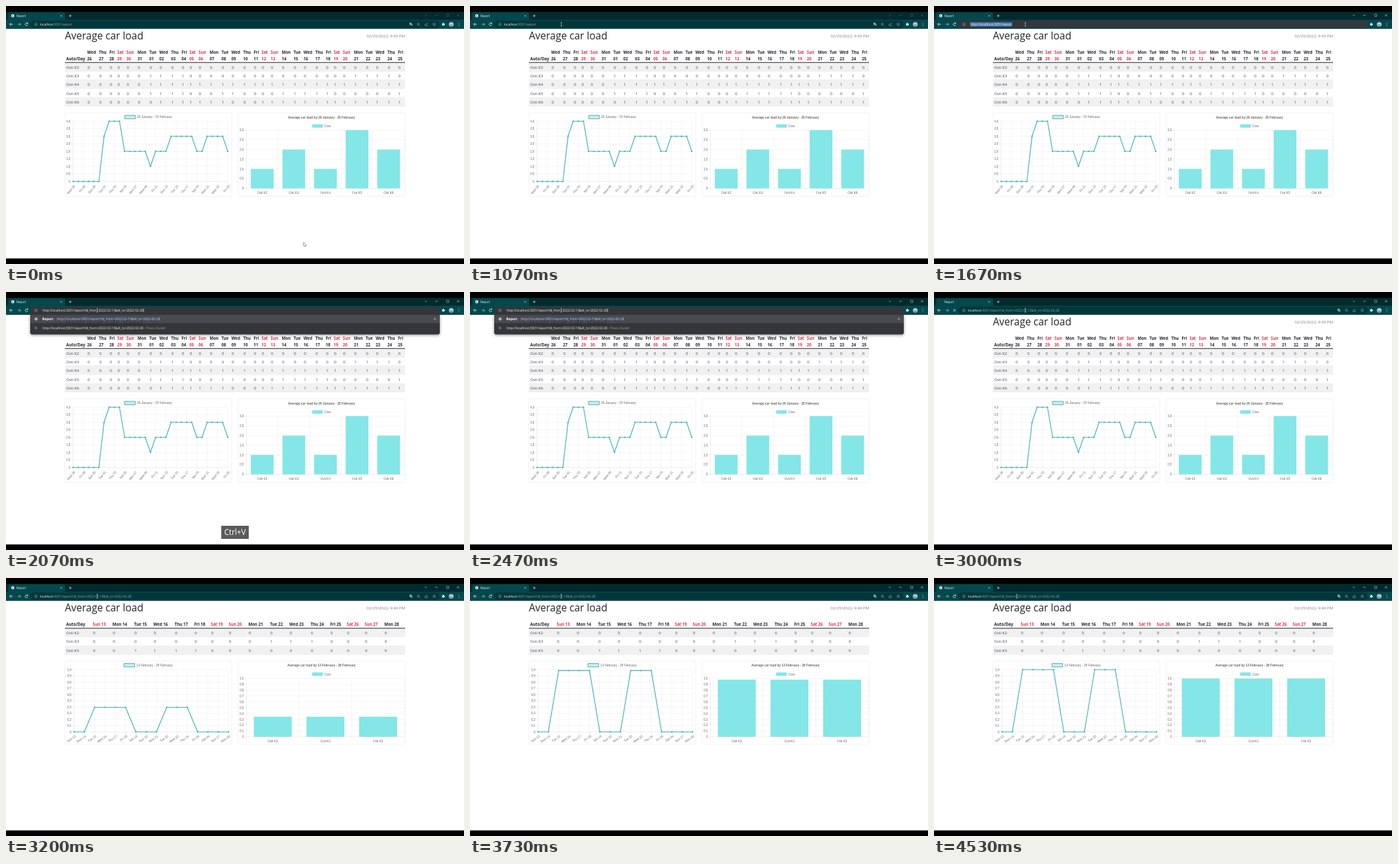
An HTML page with a canvas for the animation above (4.59 s loop, 700 by 394 pixels).

```html
<!DOCTYPE html>
<html lang="en">
<head>
<meta charset="utf-8">
<title>Report</title>
<style>
html, body { margin: 0; width: 100%; height: 100%; overflow: hidden; background: #000; }
canvas { display: block; width: 700px; height: 394px; }
</style>
</head>
<body>
<canvas id="stage"></canvas>
<script>
const LOOP = 4590;
const T = { moveStart: 120, moveEnd: 800, focus: 1400, paste: 1870, keyOff: 2420, enter: 2700,
            close: 2790, page: 3070, lineStart: 3083, barStart: 3100, nudge: 4390, nudgeEnd: 4520 };
const UI = '"Open Sans", "Noto Sans", sans-serif';
const CHART = '"Liberation Sans", Arial, sans-serif';
const TEAL = '#45b4ba', BAR = '#84e6e6', INK = '#212529', RED = '#dc3545', GREY = '#666';
const TOOLBAR = '#04484d', FRAME = '#022b2f', FIELD = '#03363a', PANEL = '#35363a';
const PATH = ':3001/report', QUERY = '?dt_from=2022-02-13&dt_to=2022-02-28';
const DAYS = ['Sun', 'Mon', 'Tue', 'Wed', 'Thu', 'Fri', 'Sat'];

const canvas = document.getElementById('stage');
const ctx = canvas.getContext('2d');
const dpr = window.devicePixelRatio || 1;
canvas.width = 700 * dpr;
canvas.height = 394 * dpr;

const clamp = v => Math.max(0, Math.min(1, v));
const progress = (t, a, b) => clamp((t - a) / (b - a));
const easeInOut = p => p * p * (3 - 2 * p);
const easeOutQuart = p => 1 - (1 - p) ** 4;
const two = n => String(n).padStart(2, '0');

function rect(x, y, w, h, color, r = 0) {
  ctx.fillStyle = color;
  ctx.beginPath();
  ctx.roundRect(x, y, w, h, r);
  ctx.fill();
}

function line(points, color, width = 0.6) {
  ctx.strokeStyle = color;
  ctx.lineWidth = width;
  ctx.lineJoin = 'round';
  ctx.beginPath();
  points.forEach(([x, y], i) => i ? ctx.lineTo(x, y) : ctx.moveTo(x, y));
  ctx.stroke();
}

function circle(x, y, r, color, width) {
  ctx.beginPath();
  ctx.arc(x, y, r, 0, Math.PI * 2);
  ctx.fillStyle = ctx.strokeStyle = color;
  ctx.lineWidth = width || 1;
  width ? ctx.stroke() : ctx.fill();
}

// y is the middle of the capitals; returns the x where the text ends
function text(s, x, y, size, color, { family = UI, weight = 400, align = 'left' } = {}) {
  ctx.font = `${weight} ${size}px ${family}`;
  ctx.textAlign = align;
  ctx.fillStyle = color;
  ctx.fillText(s, x, y + size * 0.36);
  return x + ctx.measureText(s).width;
}

const chartText = (s, x, y, align = 'left', weight = 400) =>
  text(s, x, y, 4.75, GREY, { family: CHART, align, weight });

// Days are column left edges: one width per weekday, Sunday first
function dayColumns(x, weekday, date, monthEnd, count, widths) {
  return Array.from({ length: count }, (_, i) => {
    const day = (weekday + i) % 7;
    const col = { x, name: DAYS[day], date: two((date + i - 1) % monthEnd + 1), weekend: day % 6 === 0 };
    x += widths[day];
    return col;
  });
}

const reports = {
  january: {
    range: '26 January - 25 February', clock: '02/25/2022, 9:45 PM',
    columns: dayColumns(124, 3, 26, 31, 31, [17, 18, 15.25, 18, 16, 12, 14]),
    stacked: true, ruleY: 86.3,
    rows: [
      ['Ovli K2', '0'.repeat(31)],
      ['Ovli K3', '0000001111' + '0'.repeat(16) + '11110'],
      ['Ovli K4', '000000' + '1'.repeat(25)],
      ['Ovli K5', '0000001111000110000111110000001'],
      ['Ovli K6', '00000001111111000' + '1'.repeat(14)]
    ],
    chartTop: 163,
    line: { x: 102.5, end: 339, top: 176, base: 268, max: 4, step: 0.5, every: 2, tilt: 50,
            values: [...'0000003444222221222333332233332'].map(Number) },
    bar: { top: 189.5, base: 278.5, max: 3, step: 0.5,
           names: [2, 3, 4, 5, 6], values: [1, 2, 1, 3, 2] }
  },
  february: {
    range: '13 February - 28 February', clock: '02/25/2022, 9:46 PM',
    columns: dayColumns(132.5, 0, 13, 31, 16, [30.25, 33, 29.5, 32.5, 30, 25.25, 27.25]),
    stacked: false, ruleY: 76.7,
    rows: [
      ['Ovli K2', '0'.repeat(16)],
      ['Ovli K3', '0000000001110000'],
      ['Ovli K5', '0011110000000000']
    ],
    chartTop: 126.6,
    line: { x: 104, end: 340, top: 140, base: 235, max: 1, step: 0.1, every: 1, tilt: 34,
            values: [...'0011110001110000'].map(Number) },
    bar: { top: 153.5, base: 242.5, max: 1, step: 0.1, names: [2, 3, 5], values: [1, 1, 1] }
  }
};

function table({ columns, rows, stacked, ruleY }) {
  const bold = { weight: 700 };
  const headY = ruleY - 6;
  text('Auto/Day', 92, headY, 6.15, INK, bold);
  for (const { x, name, date, weekend } of columns) {
    const color = weekend ? RED : INK;
    if (stacked) {
      text(name, x, headY - 9.3, 6.15, color, bold);
      text(date, x, headY, 6.15, color, bold);
    } else text(`${name} ${date}`, x, headY, 6.15, color, bold);
  }
  rows.forEach(([name, cells], r) => {
    const top = ruleY + r * 13.3;
    if (r % 2 === 0) rect(90, top, 520, 13.3, '#f1f1f2');
    rect(90, top + 13, 520, 0.4, '#dee2e6');
    text(name, 92, top + 7.1, 6.15, '#40454a');
    columns.forEach((c, i) => text(cells[i], c.x + 0.5, top + 7.1, 6.15, '#40454a'));
  });
  rect(90, ruleY - 0.5, 520, 1, INK);
}

function card(x, y) {
  ctx.strokeStyle = '#e6e7e8';
  ctx.lineWidth = 0.6;
  ctx.beginPath();
  ctx.roundRect(x, y, 255, 127.5, 2);
  ctx.stroke();
}

function valueAxis({ top, base, max, step }, x0, x1) {
  const n = Math.round(max / step);
  for (let i = 0; i <= n; i++) {
    const y = base - (base - top) * i / n;
    line([[x0 - 3, y], [x1, y]], i ? '#e8e8e8' : '#d8d8d8', 0.45);
    chartText(i ? (i * step).toFixed(1).replace('.', ',') : '0', x0 - 4, y, 'right');
  }
}

function lineChart({ range, columns, chartTop, line: c }, grow) {
  card(90, chartTop);
  const step = (c.end - c.x) / (c.values.length - 1);
  ctx.font = `4.75px ${CHART}`;
  const left = 217.5 - (19 + ctx.measureText(range).width) / 2;
  rect(left, chartTop + 4, 16.4, 5.2, '#d2ebec');
  ctx.strokeStyle = TEAL;
  ctx.lineWidth = 1;
  ctx.strokeRect(left, chartTop + 4, 16.4, 5.2);
  chartText(range, left + 19, chartTop + 6.5);

  valueAxis(c, c.x, c.end);
  columns.forEach((col, i) => {
    if (i % c.every) return;
    const x = c.x + i * step;
    line([[x, c.top], [x, c.base + 3]], i ? '#e8e8e8' : '#d8d8d8', 0.45);
    ctx.save();
    ctx.translate(x + 2, c.base + 6.2);
    ctx.rotate(-c.tilt * Math.PI / 180);
    chartText(`${col.name} ${col.date}`, 0, 0, 'right');
    ctx.restore();
  });
  const points = c.values.map((v, i) => [c.x + i * step, c.base - (c.base - c.top) * v / c.max * grow]);
  line(points, TEAL, 1.2);
  points.forEach(([x, y]) => circle(x, y, 1.15, TEAL));
}

function barChart({ range, chartTop, bar: c }, grow) {
  card(355, chartTop);
  chartText(`Average car load by ${range}`, 482.2, chartTop + 6.8, 'center', 700);
  rect(468, chartTop + 17.6, 16.2, 5.2, BAR);
  chartText('Cars', 486.6, chartTop + 20.2);
  const x0 = 367.5, x1 = 609, slot = (x1 - x0) / c.values.length;
  valueAxis(c, x0, x1);
  for (let i = 0; i <= c.values.length; i++) {
    const x = x0 + i * slot;
    line([[x, c.top], [x, c.base + 3]], i ? '#e8e8e8' : '#d8d8d8', 0.45);
  }
  c.values.forEach((v, i) => {
    const mid = x0 + (i + 0.5) * slot, h = (c.base - c.top) * v / c.max * grow;
    rect(mid - slot * 0.36, c.base - h, slot * 0.72, h, BAR);
    chartText(`Ovli K${c.names[i]}`, mid, c.base + 7, 'center');
  });
}

function heading(color = INK) {
  text('Average car load', 90, 45.2, 15.5, color, { weight: 500 });
}

function page(t) {
  rect(0, 34.5, 700, 351, '#fff');
  const loaded = t >= T.page;
  const report = loaded ? reports.february : reports.january;
  const grow = start => loaded ? easeOutQuart(progress(t, start, start + 1000)) : 1;
  heading();
  text(report.clock, 610, 46.2, 6.15, '#777b80', { align: 'right' });
  table(report);
  lineChart(report, grow(T.lineStart));
  barChart(report, grow(T.barStart));
}

function cross(x, y, r, color, width = 0.7) {
  line([[x - r, y - r], [x + r, y + r]], color, width);
  line([[x - r, y + r], [x + r, y - r]], color, width);
}

function globe(x, y, color) {
  circle(x, y, 2.4, color);
  line([[x - 1.4, y - 0.8], [x + 0.2, y], [x - 0.4, y + 1.5]], FRAME, 0.6);
}

function magnifier(x, y, color) {
  circle(x - 0.4, y - 0.4, 1.5, color, 0.6);
  line([[x + 0.7, y + 0.7], [x + 2, y + 2]], color, 0.7);
}

function infoIcon(x, y) {
  circle(x, y, 2, '#a9c0c2', 0.5);
  rect(x - 0.25, y - 0.4, 0.5, 1.5, '#a9c0c2');
}

function fieldIcons() {
  const c = '#9fb8ba';
  rect(616.8, 25.6, 3, 3.2, c, 0.4);
  rect(618.6, 27.2, 2.8, 3, '#6f9093', 0.4);
  magnifier(630.5, 28, c);
  line([[641, 27.5], [640.5, 30], [644.3, 30], [644.3, 28.8]], c);
  line([[641.8, 28.6], [642.6, 26.8], [644.6, 26.5]], c);
  const star = Array.from({ length: 11 }, (_, i) => {
    const r = i % 2 ? 1.1 : 2.4, a = i * Math.PI / 5;
    return [654.5 + r * Math.sin(a), 28 - r * Math.cos(a)];
  });
  line(star, c, 0.5);
}

function browser(t) {
  const typing = t >= T.focus && t < T.enter;
  const loading = t >= T.enter && t < T.page;
  rect(0, 9, 700, 12.5, FRAME);
  rect(0, 21, 700, 13.7, TOOLBAR);
  rect(3.5, 9.8, 87, 12, TOOLBAR, [3, 3, 0, 0]);
  if (!loading) globe(10.3, 15, '#e6eeee');
  text('Report', 16, 15, 4.6, '#e4eeee');
  cross(84.5, 15, 1.3, '#c9d8d9', 0.6);
  line([[96.2, 15], [100.2, 15]], '#dbe6e6', 0.7);
  line([[98.2, 13], [98.2, 17]], '#dbe6e6', 0.7);

  const ctl = t >= T.focus ? '#d5e2e2' : '#43686b';
  line([[640, 13.4], [641.6, 14.9], [643.2, 13.4]], ctl);
  line([[656, 14.2], [659.8, 14.2]], ctl);
  line([[673.3, 12.6], [676.7, 12.6], [676.7, 16], [673.3, 16], [673.3, 12.6]], ctl, 0.5);
  cross(691, 14.2, 1.6, ctl, 0.6);

  const nav = '#e3ecec';
  line([[10.6, 28], [5.6, 28]], nav, 0.8);
  line([[7.8, 25.8], [5.6, 28], [7.8, 30.2]], nav, 0.8);
  line([[17.6, 28], [22.4, 28]], '#a5bec0', 0.8);
  line([[20.3, 25.8], [22.4, 28], [20.3, 30.2]], '#a5bec0', 0.8);
  if (loading) cross(31.3, 28, 1.8, nav, 0.8);
  else {
    ctx.strokeStyle = nav;
    ctx.lineWidth = 0.8;
    ctx.beginPath();
    ctx.arc(31.3, 28, 2, 0.3, 5.5);
    ctx.stroke();
    rect(32, 25.6, 1.6, 1.6, nav);
  }
  rect(666.6, 26.4, 3.4, 3.4, nav, 0.5);
  circle(668.2, 26.2, 0.8, nav);
  circle(670.2, 28, 0.8, nav);
  circle(680.5, 28, 3.6, '#b7c6cf');
  rect(678, 28.4, 5, 2, '#6f8a96', 1);
  for (const y of [26, 28, 30]) circle(692, y, 0.5, nav);

  rect(37, 22.6, 626, 10.6, typing ? PANEL : FIELD, typing ? [3, 3, 0, 0] : 5.3);
  infoIcon(45.7, 28);
  if (!typing) {
    fieldIcons();
    const query = t >= T.enter ? QUERY : '';
    const x = text('localhost', 52, 28, 4.85, '#f1f5f5');
    text(PATH + query, x, 28, 4.85, '#91abad');
  }
}

function suggestions(t) {
  if (t < T.focus || t >= T.close) return;
  const url = 'http://localhost' + PATH;
  const pasted = t >= T.paste;
  if (t < T.enter) {
    if (!pasted) {
      ctx.font = `4.85px ${UI}`;
      rect(55.5, 24.8, ctx.measureText(url).width + 1, 6.4, '#4a78b5');
    }
    const end = text(pasted ? url + QUERY : url, 56, 28, 4.85, '#eef0f1');
    if (pasted) rect(end + 0.2, 25, 0.5, 6, '#eef0f1');
  }
  if (!pasted) return;

  ctx.save();
  ctx.shadowColor = 'rgba(0,0,0,.45)';
  ctx.shadowBlur = 4 * dpr;
  ctx.shadowOffsetY = 1.2 * dpr;
  rect(37, 34.2, 626, 30.6, PANEL, [0, 0, 3, 3]);
  ctx.restore();
  if (t < T.enter) rect(37, 32.5, 626, 2.5, PANEL);
  rect(37, 35, 626, 12.6, '#4a4b4f');
  heading('rgba(20,22,25,.3)');
  circle(46, 41.2, 2.3, '#c3c6c9');
  line([[44.8, 40.6], [46.2, 41.2], [45.7, 42.6]], '#4a4b4f', 0.6);
  let x = text('Report', 55.6, 41.2, 4.85, '#fff', { weight: 700 });
  x = text(' - ', x, 41.2, 4.85, '#9aa0a6');
  text(url + QUERY, 78, 41.2, 4.85, '#8ab4f8', { weight: 600 });
  cross(655.5, 41.2, 1.4, '#dfe1e3', 0.6);
  magnifier(45.8, 55, '#b8bcc0');
  x = text(url + QUERY, 56, 55, 4.85, '#eef0f1');
  text(' - Поиск Zuneli', x, 55, 4.85, '#9aa0a6');
}

function keyLabel(t) {
  if (t < T.paste || t >= T.keyOff) return;
  rect(329, 357, 42, 20, '#5b5b5b');
  text('Ctrl+V', 350, 366.8, 11.8, '#fff', { align: 'center' });
}

function pointer(t) {
  const p = easeInOut(progress(t, T.moveStart, T.moveEnd));
  const q = easeInOut(progress(t, T.nudge, T.nudgeEnd));
  const x = 455 + (139.5 - 455) * p - 13 * q;
  const y = 361 + (28 - 361) * p;
  if (y < 34) {
    for (const [color, w] of [['#0b2022', 1.4], ['#e8eeee', 0.6]]) {
      line([[x, y - 2.8], [x, y + 2.8]], color, w);
      line([[x - 1.2, y - 2.8], [x + 1.2, y - 2.8]], color, w);
      line([[x - 1.2, y + 2.8], [x + 1.2, y + 2.8]], color, w);
    }
    return;
  }
  const shape = [[0, 0], [0, 5.6], [1.3, 4.4], [2.2, 6.3], [3, 5.9], [2.2, 4.1], [3.9, 4], [0, 0]];
  const points = shape.map(([dx, dy]) => [x + dx, y + dy]);
  line(points, '#222', 0.8);
  ctx.fillStyle = '#fff';
  ctx.fill();
}

function draw(t) {
  ctx.setTransform(dpr, 0, 0, dpr, 0, 0);
  rect(0, 0, 700, 394, '#000');
  page(t);
  browser(t);
  suggestions(t);
  keyLabel(t);
  pointer(t);
}

const start = performance.now();
function tick() {
  draw((performance.now() - start) % LOOP);
  requestAnimationFrame(tick);
}
tick();
</script>
</body>
</html>
```
